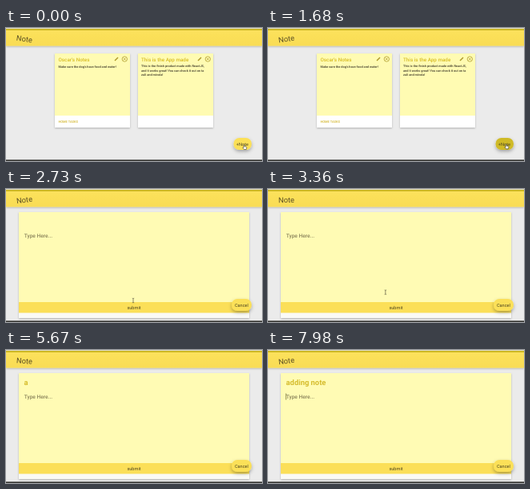
An HTML page that plays this animation: 320 by 167 pixels, repeating every 8000 ms.

```html
<!DOCTYPE html>
<html lang="en">
<head>
<meta charset="utf-8">
<title>Note</title>
<style>
html, body { margin: 0; width: 100%; height: 100%; overflow: hidden; background: #ebebeb; }
svg { display: block; width: 100vw; height: 100vh; font-family: Roboto, "Open Sans", sans-serif; text-rendering: geometricPrecision; }
text { white-space: pre; }
.title { font-size: 6.3px; font-weight: 500; fill: #d7bd24; }
.body { font-size: 3.9px; font-weight: 700; fill: #57533a; }
.tag { font-size: 4px; font-weight: 500; fill: #d2b52c; }
.label { font-size: 5.6px; fill: #4f4720; text-anchor: middle; }
.icon { fill: none; stroke: #ad982a; stroke-width: .75; }
</style>
</head>
<body>
<svg viewBox="0 0 320 167">
  <defs>
    <filter id="shadow" x="-20%" y="-20%" width="140%" height="150%">
      <feDropShadow dx="0" dy="1" stdDeviation="1" flood-opacity=".25"/>
    </filter>
    <filter id="lift" x="-40%" y="-40%" width="180%" height="220%">
      <feDropShadow dx="0" dy="2" stdDeviation="2" flood-opacity=".32"/>
    </filter>
    <linearGradient id="bar" x2="0" y2="1">
      <stop stop-color="#fce25c"/><stop offset="1" stop-color="#f9dc55"/>
    </linearGradient>
    <clipPath id="titleClip"><rect x="165" y="32" width="64.5" height="20"/></clipPath>
    <g id="tools" class="icon">
      <path d="M-2 2 L2 -2" stroke-width="1.5"/>
      <circle cx="10.3" r="3.2"/>
      <path d="M8.9 -1.4 l2.8 2.8 m0 -2.8 l-2.8 2.8"/>
    </g>
  </defs>

  <rect width="320" height="167" fill="#ebebeb"/>
  <g filter="url(#shadow)">
    <rect y="1" width="320" height="21.5" fill="url(#bar)"/>
  </g>
  <rect width="320" height="1" fill="#dcdac6"/>
  <rect y="1" width="320" height="2" fill="#cdb824"/>
  <text id="brand" x="23" y="17" font-size="9.4" text-anchor="middle" fill="#5c5024">Note</text>

  <g id="list">
    <g filter="url(#shadow)">
      <rect x="61" y="32" width="94" height="93" fill="#fff"/>
      <rect x="165" y="32" width="94" height="93" fill="#fff"/>
    </g>
    <path d="M61 32h94v78h-94z M165 32h94v78h-94z" fill="#fffbb2"/>
    <text class="title" x="65.5" y="42">Oscar's Notes</text>
    <text class="body" x="65.5" y="49.5">Make sure the dog's have food and water!</text>
    <text class="tag" x="65.5" y="119">HOME TASKS</text>
    <use href="#tools" x="138" y="39"/>
    <text class="title" x="169" y="42" clip-path="url(#titleClip)">This is the App made with</text>
    <text class="body" y="49.3">
      <tspan x="169">This is the finish product made with ReactJS,</tspan>
      <tspan x="169" dy="5.5">and it works great! You can check it out on ta</tspan>
      <tspan x="169" dy="5.5">zuli and mivola!</tspan>
    </text>
    <use href="#tools" x="242" y="39"/>
  </g>

  <g id="editor">
    <rect x="16" y="29" width="288" height="133" fill="#fafaf6" filter="url(#shadow)"/>
    <rect x="16" y="29" width="288" height="113" fill="#fffbb4"/>
    <rect x="16" y="142" width="288" height="13.5" fill="#fbdf58"/>
    <text class="label" x="160" y="150.8">submit</text>
    <text id="draft" x="22.6" y="44" font-size="9.4" font-weight="700" fill="#d6bd2f"></text>
    <text x="22.7" y="61" font-size="6.6" font-weight="500" fill="#89835a">Type Here...</text>
    <rect id="caret" width=".7" fill="#6d672f"/>
  </g>

  <rect y="165.4" width="320" height="1.6" fill="#33332f"/>
  <rect id="button" y="138" height="15" rx="7.2" filter="url(#lift)"/>
  <text id="buttonLabel" class="label" y="147.6"></text>

  <path id="hand" d="M-.8 -2 q.8 -.8 1.2 .2 v1.5 l2 .6 q.7 .4 .4 1.5 l-.6 1.7 h-2.6 l-1.8 -2.2 q.2 -.7 1.4 -.1z" fill="#fff" stroke="#222" stroke-width=".55"/>
  <path id="beam" d="M-1.2 -2.8 q1.2 0 1.2 .7 v4.2 q0 .7 -1.2 .7 M1.2 -2.8 q-1.2 0 -1.2 .7 M0 2.1 q0 .7 1.2 .7" fill="none" stroke="#55523c" stroke-width=".65"/>
</svg>
<script>
const LOOP = 8000, STEP = 70;
const OPEN = 1750, FOCUS = 4200, TYPE = 5390, TAB = 7770;
const SWING = { half: 2600, left: 2130, angle: 10 };
const DRAFT = "adding note";
const KEY_TIMES = [TYPE, 5740, 5950, 6160, 6370, 6510, 6650, 6860, 7000, 7140, 7350];
const POINTER = [[0, 298, 149], [840, 298, 149], [1260, 298, 148.3], [2380, 298, 148.3],
  [2730, 159, 140], [3220, 159, 140], [3920, 42, 40], [4410, 42, 40], [4620, 46, 41]];

const el = id => document.getElementById(id);
const show = (node, on) => node.setAttribute("visibility", on ? "visible" : "hidden");
const set = (node, attrs) => {
  for (const key in attrs) node.setAttribute(key, attrs[key]);
};
const progress = (t, a, b) => Math.min(1, Math.max(0, (t - a) / (b - a)));
const ease = p => p * p * (3 - 2 * p);
const mix = (a, b, p) => a + (b - a) * p;

const [brand, list, editor, draft, caret, button, buttonLabel, hand, beam] =
  ["brand", "list", "editor", "draft", "caret", "button", "buttonLabel", "hand", "beam"].map(el);

function pointerAt(t) {
  const next = POINTER.findIndex(p => p[0] > t);
  if (next < 0) return POINTER.at(-1).slice(1);
  const a = POINTER[next - 1], b = POINTER[next];
  const p = ease(progress(t, a[0], b[0]));
  return [mix(a[1], b[1], p), mix(a[2], b[2], p)];
}

function drawButton(t, opened) {
  const hover = progress(t, 1120, 1540) * (1 - progress(t, 2380, 2660));
  const light = [251, 224, 88], dark = [207, 186, 40];
  const x = opened ? 282 : 284.5;
  set(button, {
    x, width: 307 - x,
    fill: `rgb(${light.map((c, i) => Math.round(mix(c, dark[i], hover)))})`
  });
  buttonLabel.setAttribute("x", opened ? 294.4 : 295.4);
  buttonLabel.textContent = opened ? "Cancel" : "+Note";
}

function drawDraft(t) {
  const count = KEY_TIMES.filter(k => k <= t).length;
  draft.textContent = DRAFT.slice(0, count);
  const inBody = t >= TAB;
  const blinkOn = t < 4480 || (t >= 5040 && t < 5600) || t >= 5740;
  const width = count ? draft.getComputedTextLength() : 0;
  set(caret, {
    x: inBody ? 22.2 : 22.4 + width,
    y: inBody ? 54.5 : 36,
    height: inBody ? 8 : 9.5
  });
  show(caret, t >= FOCUS && blinkOn);
}

function draw(time) {
  const t = Math.floor((time % LOOP) / STEP) * STEP;
  const opened = t >= OPEN;
  const angle = -SWING.angle * Math.cos(Math.PI * (t - SWING.left) / SWING.half);
  brand.setAttribute("transform", `rotate(${angle.toFixed(2)} 23 14)`);
  list.style.display = opened ? "none" : "";
  editor.style.display = opened ? "" : "none";
  drawButton(t, opened);
  if (opened) drawDraft(t);

  const [x, y] = pointerAt(t);
  const move = `translate(${x} ${y})`;
  hand.setAttribute("transform", move);
  beam.setAttribute("transform", move);
  show(hand, t < 2450);
  show(beam, t >= 2450 && t < TYPE - 210);
}

const start = performance.now();
function tick() {
  draw(performance.now() - start);
  requestAnimationFrame(tick);
}
tick();
</script>
</body>
</html>
```
